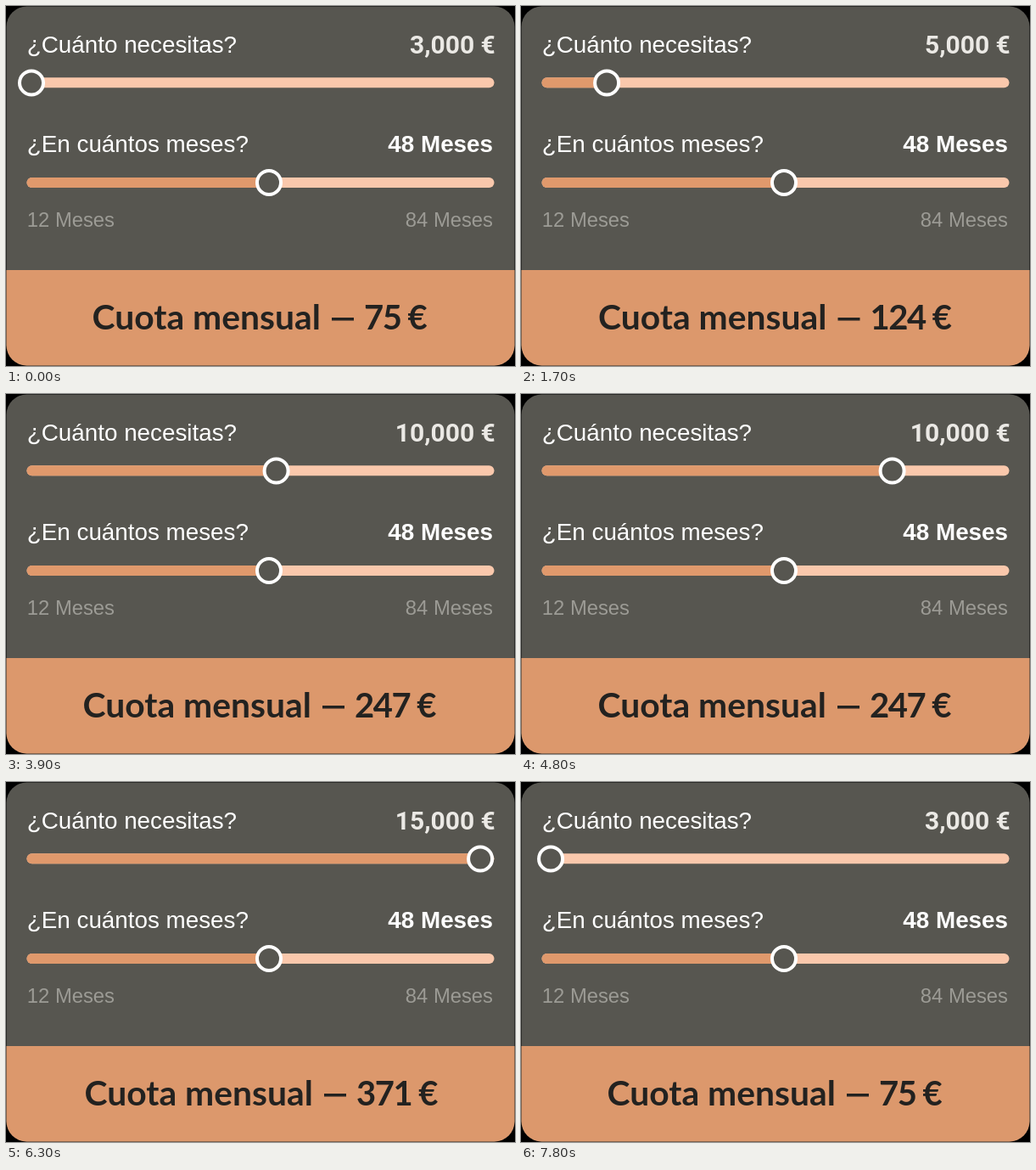
Write an HTML page that moves like this. It is 600x424 px and loops after 7900 ms.

```html
<!DOCTYPE html>
<html lang="es">
<head>
<meta charset="utf-8">
<title>Cuota mensual</title>
<style>
  html, body { margin: 0; width: 100%; height: 100%; overflow: hidden; background: #000; }
  svg { display: block; width: 600px; height: 424px; }
  text { font: 27.8px "Liberation Sans", Arial, sans-serif; fill: #fff; }
  line { stroke: #fac8ac; stroke-width: 12; stroke-linecap: round; }
  .fill { stroke: #e0996c; }
  circle { fill: #575650; stroke: #fff; stroke-width: 4; }
  .end { text-anchor: end; }
  .bold { font-weight: bold; }
  .limit { font-size: 23.8px; fill: #9c9b95; }
  #amount { font: bold 30px Roboto, sans-serif; fill: #ebe9e5; }
  #fee text { font: bold 40.8px Lato, sans-serif; fill: #232220; }
  #fee #num { font-size: 40px; letter-spacing: -1.5px; }
</style>
</head>
<body>
<svg viewBox="0 0 600 424">
  <clipPath id="card"><rect x=".5" y=".5" width="599" height="423" rx="24"/></clipPath>
  <g clip-path="url(#card)">
    <rect width="600" height="424" fill="#575650"/>
    <rect y="311" width="600" height="113" fill="#dc986c"/>
  </g>

  <text x="24.8" y="54.5">¿Cuánto necesitas?</text>
  <text id="amount" class="end" x="576.8" y="55.5"></text>
  <line x1="30.5" y1="90.3" x2="569.5" y2="90.3"/>
  <line id="bar" class="fill" x1="30.5" y1="90.3" x2="31" y2="90.3"/>
  <circle id="knob" cy="90.5" r="14"/>

  <text x="24.8" y="172">¿En cuántos meses?</text>
  <text class="end bold" x="574" y="172">48 Meses</text>
  <line x1="30.5" y1="208" x2="569.5" y2="208"/>
  <line class="fill" x1="30.5" y1="208" x2="304" y2="208"/>
  <circle cx="310" cy="208" r="14"/>
  <text class="limit" x="24.8" y="260">12 Meses</text>
  <text class="limit end" x="574" y="260">84 Meses</text>

  <g id="fee">
    <text x="-1" y="381">Cuota mensual</text>
    <rect x="281.5" y="367" width="26" height="3.5" fill="#232220"/>
    <text id="num" x="319.5" y="381"></text>
  </g>
</svg>
<script>
  const LOOP = 7900;
  const $ = id => document.getElementById(id);

  // start, end, knob from, knob to
  const moves = [
    [0, 1000, 30, 94],
    [1518, 2930, 94, 268],
    [3292, 4972, 268, 442],
    [5176, 6576, 442, 571],
    [6750, 7870, 571, 30]
  ];
  // time, amount, monthly fee, left edge of the fee line
  const quotes = [
    [0, '3,000', 75, 102.5],
    [950, '5,000', 124, 92],
    [2900, '10,000', 247, 91.5],
    [4960, '15,000', 371, 93.5],
    [6560, '20,000', 494, 91.5],
    [7600, '3,000', 75, 102.5]
  ];

  const ease = u => (1 - Math.cos(Math.PI * Math.min(1, Math.max(0, u)))) / 2;
  const latest = (list, t) => list.filter(e => e[0] <= t).pop();

  function draw(t) {
    const [start, end, from, to] = latest(moves, t);
    const x = from + (to - from) * ease((t - start) / (end - start));
    $('knob').setAttribute('cx', x);
    $('bar').setAttribute('x2', Math.max(31, x - 6));

    const [, amount, fee, left] = latest(quotes, t);
    $('amount').textContent = amount + ' €';
    $('num').textContent = fee + ' €';
    $('fee').setAttribute('transform', `translate(${left} 0)`);
  }

  const begin = performance.now();
  function tick() {
    draw((performance.now() - begin) % LOOP);
    requestAnimationFrame(tick);
  }
  tick();
</script>
</body>
</html>
```
